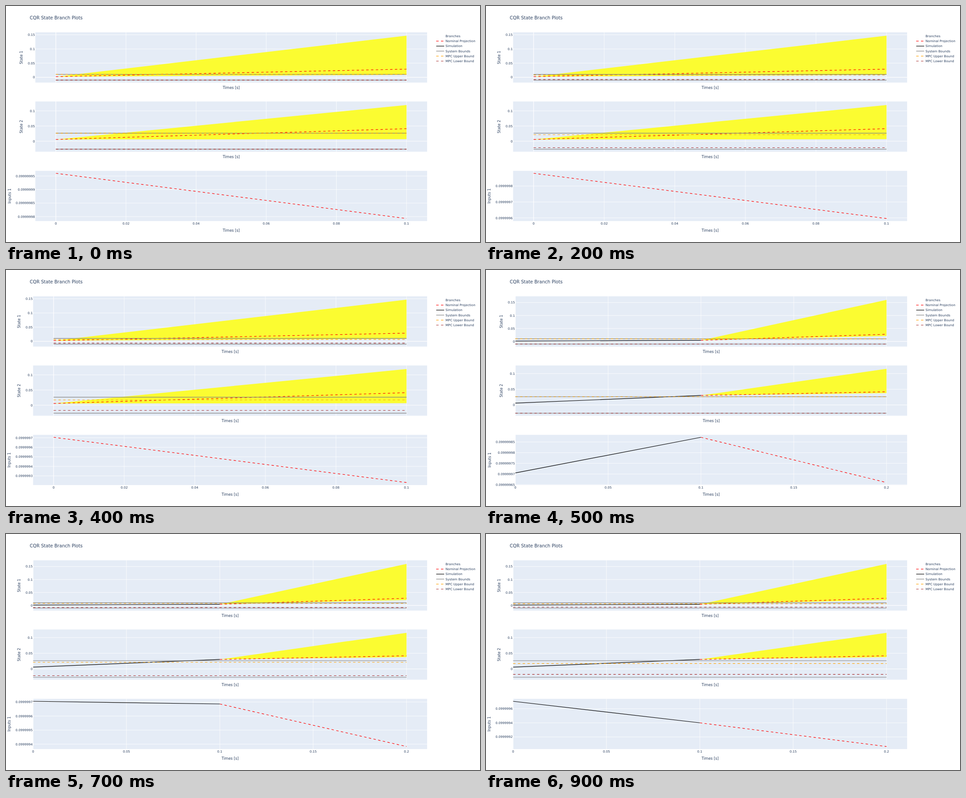
Recreate the animation shown at these times as an HTML page. Size 1058 px wide and 529 px high, loop 1 s.

```html
<!DOCTYPE html>
<html lang="en">
<head>
<meta charset="utf-8">
<title>CQR State Branch Plots</title>
<style>
html, body { margin: 0; width: 100%; height: 100%; overflow: hidden; background: #fff; }
svg { display: block; width: 1058px; height: 529px; }
text { font-family: "DejaVu Sans", Verdana, sans-serif; fill: #2a3f5f; white-space: pre; }
</style>
</head>
<body>
<svg id="stage" viewBox="0 0 1058 529"></svg>
<script>
const stage = document.getElementById('stage');
const RIGHT = 940, X_END = 894, HEIGHT = 112.6;
const ORANGE = 'orange', BROWN = '#a52a2a', GRAY = 'gray';

// Per phase: x ticks, then each state panel in pixels (zero line, px per unit, curve ends)
const PHASES = [
  {
    xTicks: [0, .02, .04, .06, .08, .1], xMax: .1,
    states: [
      { zero: 159.8, scale: 635, ticks: [0, .05, .1, .15], start: 158.4, end: 141.5, high: 66.5, low: 154.3 },
      { zero: 303, scale: 680, ticks: [0, .05, .1], start: 299.2, end: 275, high: 222, low: 298.6 }
    ]
  },
  {
    xTicks: [0, .05, .1, .15, .2], xMax: .2,
    states: [
      { zero: 160.2, scale: 582, ticks: [0, .05, .1, .15], sim: 159.3, start: 157.6, end: 144, high: 67, low: 148 },
      { zero: 302.5, scale: 703, ticks: [0, .05, .1], sim: 298.4, start: 281.2, end: 273, high: 221.5, low: 276 }
    ]
  }
];
const TOPS = [59, 214, 369.5];
const BOUNDS = [.01, .0263];

// Inputs as (0.1 - value) in units of 1e-8: projection start and end for each step
const INPUTS = [
  [4, 20.7], [7.2, 29], [12, 40.4], [19.2, 56], [29.5, 77],
  [12.8, 34], [15.3, 35], [31.4, 61.7], [44, 76], [60, 93.6]
];
const FIRST_INPUT = 29.5;

const line = (x1, y1, x2, y2, color, width = 1.2, dashed = false) =>
  `<path d="M${x1} ${y1}L${x2} ${y2}" stroke="${color}" stroke-width="${width}"` +
  `${dashed ? ' stroke-dasharray="5.33"' : ''}/>`;

const text = (str, x, y, size = 7.1, anchor = 'start', turned = false) =>
  `<text x="${x}" y="${y + size * .36}" font-size="${size}" text-anchor="${anchor}"` +
  `${turned ? ` transform="rotate(-90 ${x} ${y})"` : ''}>${str}</text>`;

function legend() {
  const items = [
    ['Branches'], ['Nominal Projection', 'red', true], ['Simulation', 'black'],
    ['System Bounds', GRAY], ['MPC Upper Bound', ORANGE, true], ['MPC Lower Bound', BROWN, true]
  ];
  return items.map(([name, color, dashed], i) => {
    const y = 67.5 + i * 11.2;
    return (color ? line(960.3, y, 978, y, color, 1.2, dashed) : '') + text(name, 981, y);
  }).join('');
}

function render(step) {
  const second = step >= 5;
  const phase = PHASES[+second];
  const [mid, last] = INPUTS[step];
  const inputs = second ? [FIRST_INPUT, mid, last] : [mid, last];
  const min = Math.min(...inputs), span = Math.max(...inputs) - min;
  const tickStep = span < 26 ? 5 : span < 55 ? 10 : 20;
  const left = tickStep === 5 ? 65.5 : 60.5;
  const xZero = second ? left : left + 45.8;
  const xAt = t => xZero + (X_END - xZero) * t / phase.xMax;
  const xStart = second ? xAt(.1) : xZero;
  const inputY = v => 375 + (v - min) / span * 101.4;
  let out = text('CQR State Branch Plots', 53, 26, 10.07) + legend();

  function panel(i, title, titleX) {
    const top = TOPS[i], bottom = top + HEIGHT;
    out += `<rect x="${left}" y="${top}" width="${RIGHT - left}" height="${HEIGHT}" fill="#e5ecf6"/>`;
    for (const t of phase.xTicks) {
      out += line(xAt(t), top, xAt(t), bottom, '#fff', t ? .8 : 1.2);
      if (i === 2) out += text(t, xAt(t), 487, 7.1, 'middle');
    }
    out += text('Times [s]', (left + RIGHT) / 2, [183.5, 338.5, 502.8][i], 8.3, 'middle');
    out += text(title, titleX, top + HEIGHT / 2, 8.3, 'middle', true);
  }

  function yTick(label, y, width = .8) {
    out += line(left, y, RIGHT, y, '#fff', width) + text(label, left - 1, y, 7.1, 'end');
  }

  phase.states.forEach((s, i) => {
    panel(i, 'State ' + (i + 1), left - 31.3);
    for (const t of s.ticks) yTick(t, s.zero - t * s.scale, t ? .8 : 1.2);
    out += `<path d="M${xStart} ${s.start}L${X_END} ${s.high}V${s.low}Z" fill="#fbfc31"/>`;
    out += line(xStart, s.start, X_END, s.end, 'red', 1.2, true);
    if (second) out += line(xZero, s.sim, xStart, s.start, 'black');
    const bound = BOUNDS[i] * s.scale;
    const tightened = bound * .9 ** (step % 5);
    const level = (offset, color, dashed) =>
      line(xZero, s.zero + offset, X_END, s.zero + offset, color, 1.2, dashed);
    out += level(-bound, GRAY) + level(bound, GRAY);
    out += level(-tightened, ORANGE, true) + level(tightened, BROWN, true);
  });

  panel(2, 'Inputs 1', tickStep === 5 ? 8 : 7);
  for (let v = 0; v < 100; v += tickStep) {
    const y = inputY(v);
    if (y >= TOPS[2] && y <= TOPS[2] + HEIGHT) yTick(+(.1 - v * 1e-8).toFixed(8), y);
  }
  out += line(xStart, inputY(mid), X_END, inputY(last), 'red', 1.2, true);
  if (second) out += line(xZero, inputY(FIRST_INPUT), xStart, inputY(mid), 'black');
  stage.innerHTML = out;
}

let shown = -1;
function tick() {
  const step = Math.floor(performance.now() / 100) % 10;
  if (step !== shown) render(shown = step);
  requestAnimationFrame(tick);
}
tick();
</script>
</body>
</html>
```
